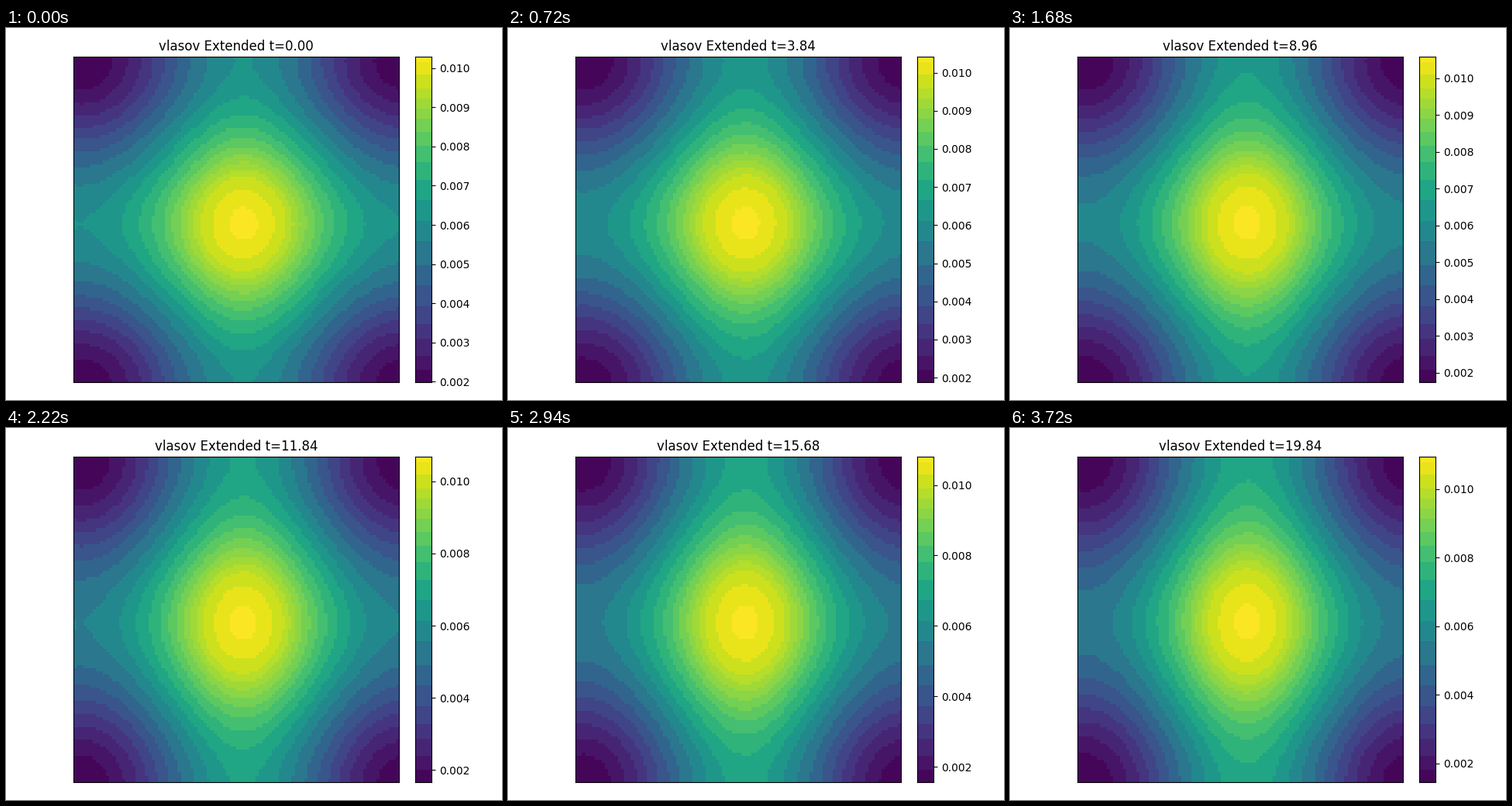
Animation, 640 px wide and 480 px high, one loop 3.75 s. Source, as a matplotlib script:

```python
import numpy as np
import matplotlib.pyplot as plt
from matplotlib.animation import FuncAnimation
from matplotlib.colors import ListedColormap

W, H, DPI = 640, 480, 100
FRAMES, INTERVAL, DT = 125, 30, 0.16
CELLS, SIDE = 100, 420
LEFT, TOP = 87.2, 37.2

# Colour bands over the normalised density
EDGES = [0.036, 0.08, 0.13, 0.18, 0.235, 0.295, 0.36, 0.432, 0.498, 0.559,
         0.62, 0.677, 0.727, 0.77, 0.81, 0.843, 0.873, 0.903, 0.947, 0.988]
bounds = np.array([0, *EDGES, 1])
cmap = ListedColormap(plt.get_cmap("viridis")((bounds[1:] + bounds[:-1]) / 2))

fig = plt.figure(figsize=(W / DPI, H / DPI), dpi=DPI, facecolor="white")


def pixel_axes(x, y, w, h):
    return fig.add_axes([x / W, 1 - (y + h) / H, w / W, h / H])


def band(level):
    return np.digitize(level, EDGES)


def limits(t):
    return 0.001982 - 2.72e-5 * t, 0.010287 + 3.28e-5 * t


def density(t):
    """Normalised density: 1 at the peak, 0 in the troughs."""
    pos = (np.arange(CELLS) + 0.5) * SIDE / CELLS
    k = 2 * np.pi / SIDE
    x = k * (pos + LEFT - 306.3)
    y = k * (pos + TOP - 253 + 0.1 * t)
    a = 0.251 + 0.00315 * t - 3e-5 * t * t
    drop_x = a * (1 - np.cos(x)) + 0.014 * (1 - np.cos(2 * x))
    drop_y = (0.5 - a) * (1 - np.cos(y))
    return 1 - drop_x[None, :] - drop_y[:, None]


style = dict(cmap=cmap, vmin=0, vmax=len(EDGES), interpolation="nearest",
             aspect="auto")

ax = pixel_axes(LEFT, TOP, SIDE, SIDE)
image = ax.imshow(band(density(0)), **style)
ax.set(xticks=[], yticks=[])
title = ax.set_title("")

cax = pixel_axes(LEFT + SIDE * 1.05, TOP, SIDE / 20, SIDE)
ramp = band(np.linspace(0, 1, 256))[:, None]
scale = cax.imshow(ramp, origin="lower", extent=(0, 1, *limits(0)), **style)
cax.set_xticks([])
cax.yaxis.tick_right()


def update(i):
    t = i * DT
    lo, hi = limits(t)
    image.set_data(band(density(t)))
    scale.set_extent((0, 1, lo, hi))
    cax.set_ylim(lo, hi)
    title.set_text(f"vlasov Extended t={t:.2f}")
    return image, scale, title


anim = FuncAnimation(fig, update, frames=FRAMES, interval=INTERVAL,
                     repeat=True, repeat_delay=0, blit=False)
plt.show()
```
